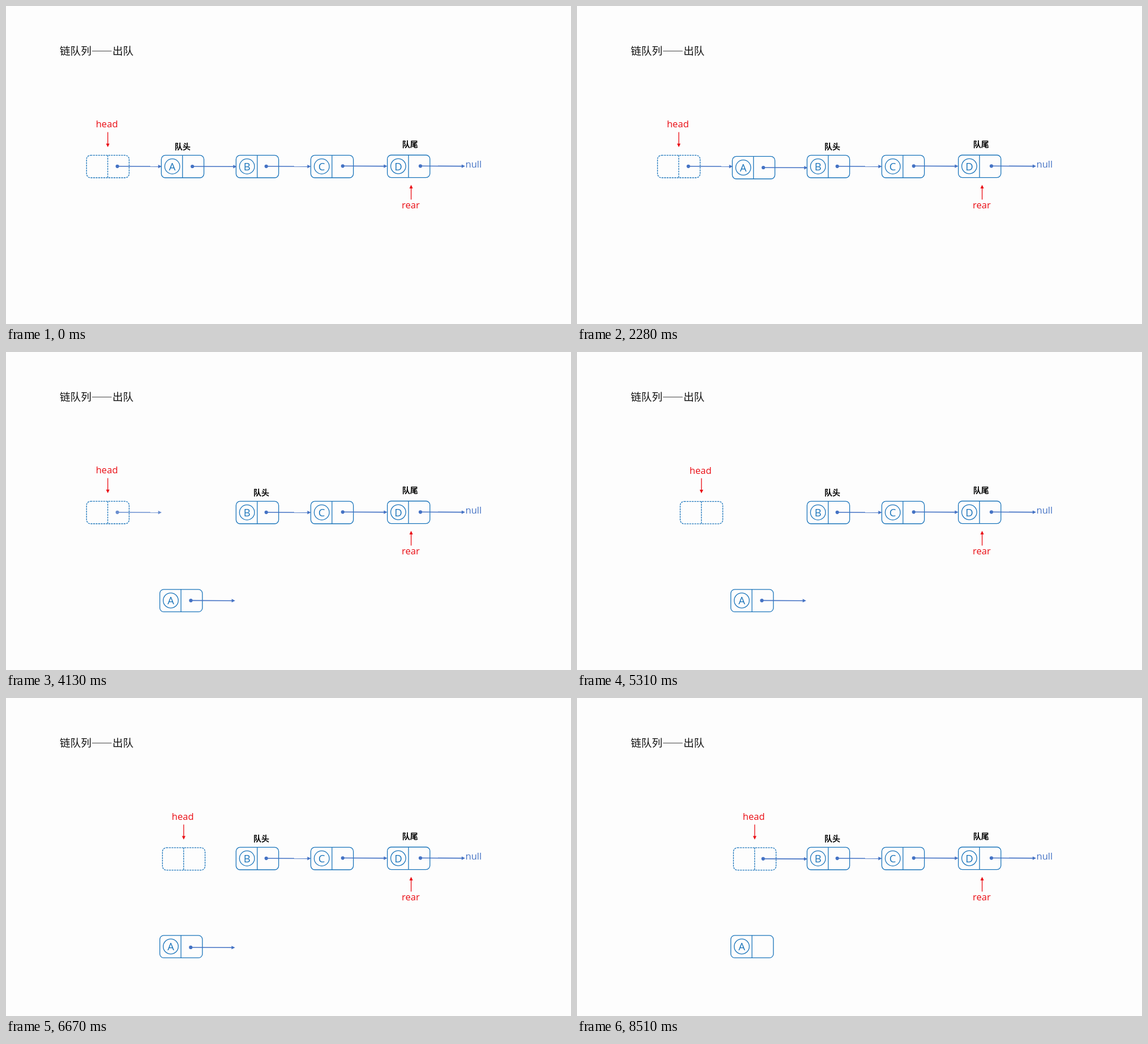
An HTML page for the animation above (8540 ms loop, 998 by 561 pixels).

```html
<!DOCTYPE html>
<html lang="zh-CN">
<head>
<meta charset="utf-8">
<title>链队列——出队</title>
<style>
  html, body { margin: 0; width: 100%; height: 100%; overflow: hidden; background: #fdfdfd; }
  svg { display: block; width: 998px; height: 561px; }
  text { font: 16.6px "Open Sans", "Noto Sans", sans-serif; }
  .cjk { font: 18.6px "Noto Sans CJK SC", "Noto Sans CJK", sans-serif; fill: #111; }
  .label { font-size: 14px; font-weight: 700; fill: #000; text-anchor: middle; }
  .node { fill: none; stroke: #1b75bb; stroke-width: 1.3; }
  .dashed { stroke-dasharray: 3.2 1.3; }
  .letter { font-size: 18.5px; fill: #1b75bb; text-anchor: middle; }
  .link { fill: #4472c4; stroke: none; }
  .link line { stroke: #4472c4; stroke-width: 1.6; }
  .red { fill: #ea0d14; }
  .red line { stroke: #ea0d14; stroke-width: 1.3; }
</style>
</head>
<body>
<svg id="stage" viewBox="0 0 998 561"></svg>
<script>
const LOOP = 8540;
const MOVE = 1750;
const FADE = 440;
const START = { label: 130, node: 2140, fade: 4040, head: 4635, link: 6655 };

const node = (x, y, letter) => `
  <g class="node${letter ? '' : ' dashed'}">
    <rect x="${x}" y="${y}" width="75.2" height="39.6" rx="7"/>
    <path d="M${x + 37.4} ${y}v39.6"/>
    ${letter ? `<circle cx="${x + 19.3}" cy="${y + 19.6}" r="13.3"/>` : ''}
  </g>
  ${letter ? `<text class="letter" x="${x + 19.3}" y="${y + 26.6}">${letter}</text>` : ''}`;

const link = (x, y, tip, id = '') => `
  <g class="link" id="${id}">
    <circle cx="${x}" cy="${y}" r="3.1"/>
    <line x1="${x}" y1="${y}" x2="${tip - 5}" y2="${y + 0.3}"/>
    <path d="M${tip} ${y + 0.3}l-6.2 -3.1v6.2z"/>
  </g>`;

// Vertical pointer from y to tip
const pointer = (x, y, tip) => {
  const back = Math.sign(y - tip) * 6.2;
  return `<line x1="${x}" y1="${y}" x2="${x}" y2="${tip + back * 0.8}"/>
    <path d="M${x} ${tip}l-3.1 ${back}h6.2z"/>`;
};

document.getElementById('stage').innerHTML = `
  <text class="cjk" x="95" y="86">链队列——出队</text>
  <g id="head">
    ${node(142.3, 263.4)}
    <g class="red">
      <text x="158.7" y="214.3">head</text>
      ${pointer(179.8, 222.5, 249)}
    </g>
  </g>
  ${link(196.7, 282.8, 275, 'headLink')}
  <g id="first">${node(274.4, 263.4, 'A')}</g>
  ${node(406.4, 263.4, 'B')}
  ${node(538.4, 263.4, 'C')}
  ${node(673.6, 263, 'D')}
  ${link(329.2, 283, 407.5, 'firstLink')}
  ${link(459.7, 282.8, 538.5)}
  ${link(594.8, 282.3, 673.5)}
  ${link(732, 282.3, 811)}
  <text x="811.5" y="285" fill="#4472c4">null</text>
  <text class="cjk label" id="front" x="312" y="252.6">队头</text>
  <text class="cjk label" x="713.7" y="249.4">队尾</text>
  <g class="red">
    ${pointer(715.6, 341.5, 315.5)}
    <text x="699" y="357">rear</text>
  </g>`;

const part = id => document.getElementById(id);
const [head, headLink, first, firstLink, front] =
  ['head', 'headLink', 'first', 'firstLink', 'front'].map(part);

const progress = (t, start, length) => Math.min(1, Math.max(0, (t - start) / length));
const ease = u => u < 0.5 ? 2 * u * u : 1 - 2 * (1 - u) * (1 - u);
const moved = (t, start) => ease(progress(t, start, MOVE));
const shift = (el, x, y) => el.setAttribute('transform', `translate(${x} ${y})`);

function draw(t) {
  shift(front, 139 * moved(t, START.label), 0);

  const drop = moved(t, START.node);
  shift(first, -2.7 * drop, 155.4 * drop);

  headLink.setAttribute('opacity', 1 - progress(t, START.fade, FADE));

  const advance = moved(t, START.head);
  shift(head, 134.1 * advance, 0.7 * advance);

  if (t < START.link) {
    shift(firstLink, -2.7 * drop, 155.4 * drop);
  } else {
    const rise = moved(t, START.link);
    shift(firstLink, -2.9 + 2.5 * rise, 157 - 156.4 * rise);
  }
}

const origin = performance.now();
function tick() {
  draw((performance.now() - origin) % LOOP);
  requestAnimationFrame(tick);
}
tick();
</script>
</body>
</html>
```
